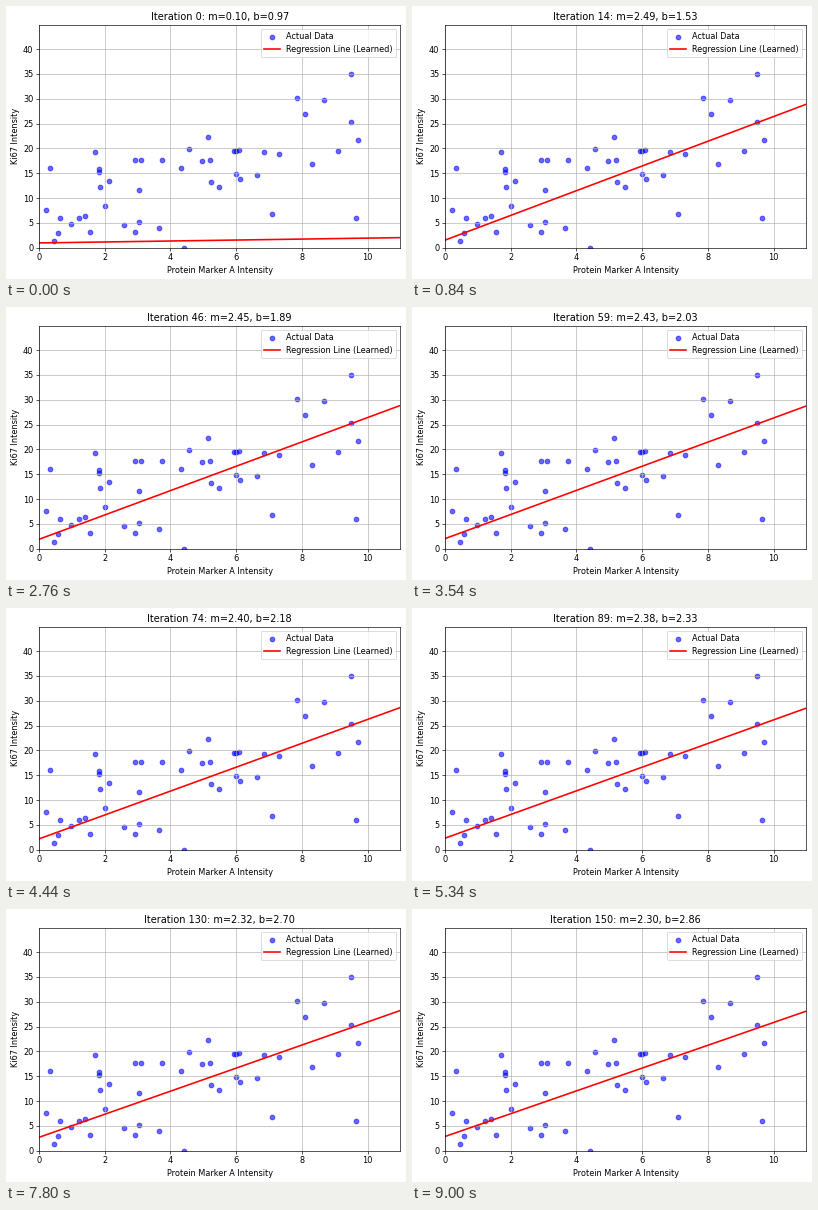
A matplotlib script that plays this animation: 400x273 px, repeating every 9060 ms.

```python
import numpy as np
import matplotlib.pyplot as plt
from matplotlib.animation import FuncAnimation

W, H, DPI = 400, 273, 64
SCALE = 58.25 / DPI     # shrinks the default sizes to the small stage
STEPS, RATE = 150, 0.01
LEFT, BOTTOM, WIDTH, HEIGHT = 32.9, 31.25, 361.5, 223.2

rc = plt.rcParams
rc["font.family"] = "DejaVu Sans"
for key in ("font.size", "axes.linewidth", "axes.labelpad", "axes.titlepad",
            "grid.linewidth", "patch.linewidth", "lines.linewidth",
            "lines.markersize"):
    rc[key] *= SCALE
for axis in ("xtick", "ytick"):
    for part in ("size", "width", "pad"):
        rc[f"{axis}.major.{part}"] *= SCALE

# Noisy linear data and a random starting guess
rng = np.random.RandomState(42)
x = rng.rand(50) * 10
y = 2 * x + 5 + rng.randn(50) * 7
start = rng.randn(2)


def descend(m, b):
    """Parameters before the first step and after each following one."""
    path = [(m, b)]
    for _ in range(STEPS):
        err = m * x + b - y
        m, b = m - RATE * np.mean(err * x), b - RATE * np.mean(err)
        path.append((m, b))
    return path


path = descend(*start)

fig = plt.figure(figsize=(W / DPI, H / DPI), dpi=DPI, facecolor="white")
ax = fig.add_axes([LEFT / W, BOTTOM / H, WIDTH / W, HEIGHT / H])
ax.scatter(x, y, color="blue", alpha=0.6, label="Actual Data")
span = np.array([0, 11])
line, = ax.plot(span, 0 * span, color="red", linewidth=2 * SCALE,
                label="Regression Line (Learned)")
ax.set(xlim=(0, 11), ylim=(0, y.max() + 10),
       xticks=range(0, 11, 2), yticks=range(0, 41, 5),
       xlabel="Protein Marker A Intensity", ylabel="Ki67 Intensity")
ax.grid(True)
ax.legend(loc="upper right")
title = ax.set_title("")


def draw(i):
    m, b = path[i]
    line.set_ydata(m * span + b)
    title.set_text(f"Iteration {i}: m={m:.2f}, b={b:.2f}")
    return line, title


anim = FuncAnimation(fig, draw, frames=STEPS + 1, interval=60,
                     init_func=lambda: draw(0), repeat=True, repeat_delay=0)
plt.show()
```
